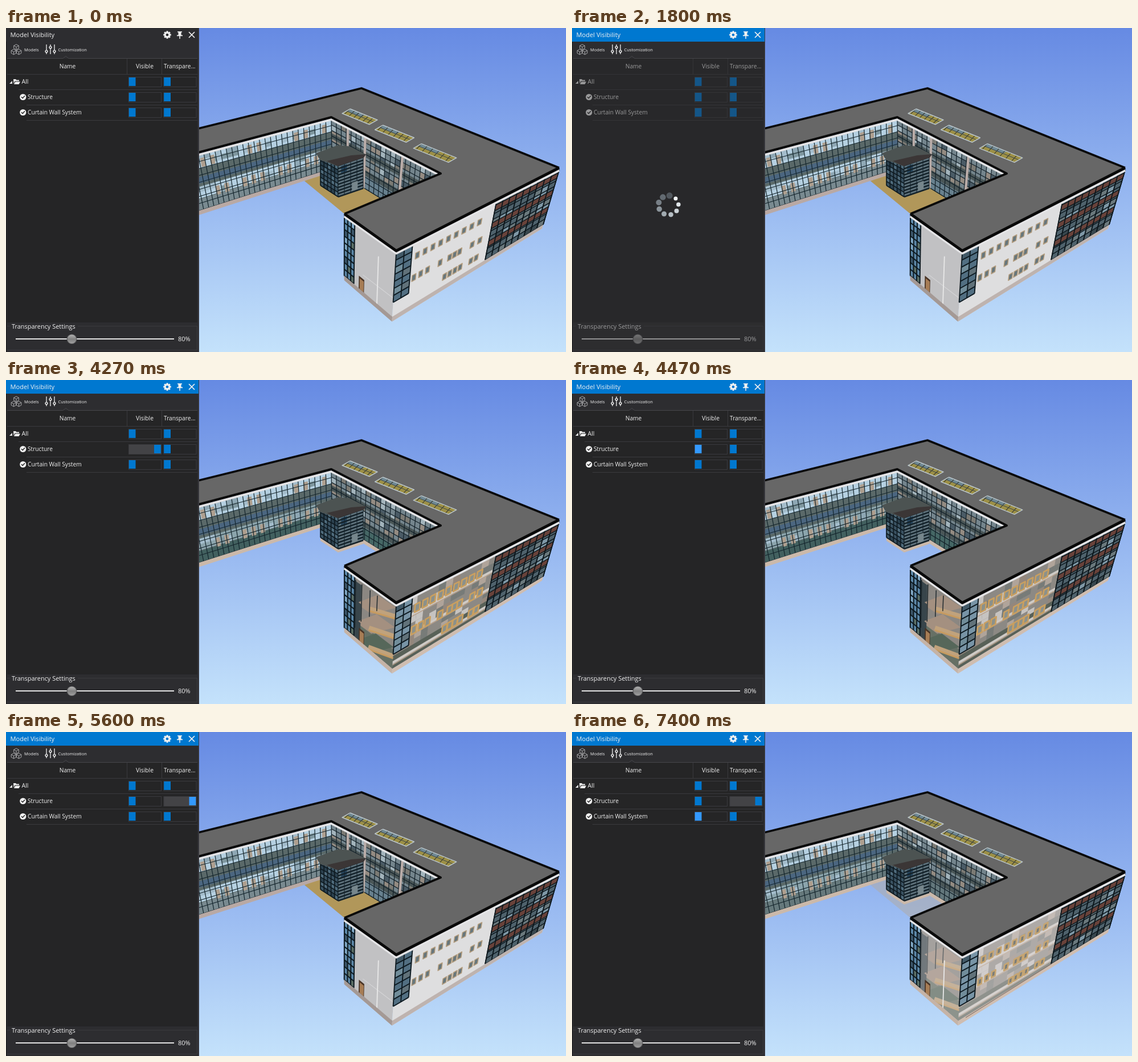
Write an HTML page with a canvas that moves like this. It is 983x570 px and loops after 8000 ms.

```html
<!DOCTYPE html>
<html lang="en">
<head>
<meta charset="utf-8">
<title>Model Visibility</title>
<style>
html,body{margin:0;width:100%;height:100%;overflow:hidden;background:#252526}
canvas{display:block;width:983px;height:570px}
</style>
</head>
<body>
<canvas id="stage" width="983" height="570"></canvas>
<script>
const W = 983, H = 570, LOOP = 8000;
const SOLID = 0, HIDDEN = 1, CLEAR = 2;
const view = document.getElementById('stage').getContext('2d');
let c = view;

// ---------- helpers ----------
const noise = n => { const s = Math.sin(n * 12.9898 + 4.1) * 43758.5453; return s - Math.floor(s); };
const pick = (list, r) => list[Math.floor(r * list.length)];
const mix = (a, b, t) => [a[0] + (b[0] - a[0]) * t, a[1] + (b[1] - a[1]) * t];
const times = (n, f) => { for (let i = 0; i < n; i++) f(i); };

function trace(pts) {
  c.beginPath();
  pts.forEach(([x, y], i) => i ? c.lineTo(x, y) : c.moveTo(x, y));
}
function fill(color, ...pts) { trace(pts); c.closePath(); c.fillStyle = color; c.fill(); }
function line(color, w, ...pts) { trace(pts); c.strokeStyle = color; c.lineWidth = w; c.stroke(); }
function box(color, x, y, w, h) { c.fillStyle = color; c.fillRect(x, y, w, h); }
function disc(color, x, y, r) { c.beginPath(); c.arc(x, y, r, 0, 7); c.fillStyle = color; c.fill(); }

// A surface maps (u, v) in the unit square to the stage.
const quad = (tl, tr, br, bl) => (u, v) => mix(mix(tl, tr, u), mix(bl, br, u), v);
const part = (P, u0, v0, u1, v1) => (u, v) => P(u0 + (u1 - u0) * u, v0 + (v1 - v0) * v);
const outline = P => [P(0, 0), P(1, 0), P(1, 1), P(0, 1)];
const cell = (P, color, u0 = 0, v0 = 0, u1 = 1, v1 = 1) => fill(color, ...outline(part(P, u0, v0, u1, v1)));

function grid(P, nu, nv, color, w) {
  times(nu + 1, i => line(color, w, P(i / nu, 0), P(i / nu, 1)));
  times(nv + 1, j => line(color, w, P(0, j / nv), P(1, j / nv)));
}
function speckle(P, nu, nv, seed, share, colors) {
  times(nu * nv, k => {
    const i = k % nu, j = Math.floor(k / nu), r = noise(seed + i * 17 + j * 5);
    if (r < share) cell(P, pick(colors, r / share), i / nu, j / nv, (i + 1) / nu, (j + 1) / nv);
  });
}
function glazing(P, nu, nv, base, tints, seed, w) {
  cell(P, base);
  speckle(P, nu, nv, seed, .5, tints);
  grid(P, nu, nv, '#0e1a21', w);
}

// ---------- building ----------
const BACK = [624, 106], RIGHT = [971, 246], FRONT = [685, 392], NOSE = [594, 327];
const INNER = [763, 256], NOOK = [571, 157], FAR_OUT = [240, 201], FAR_IN = [240, 245];
const SILL = .93;

// Uprights lean towards a vanishing point and grow with nearness.
const foot = ([x, y]) => [x - (x - 590) * .079, y * 1.12 + 73];
function wall(p, q) {
  const a = [p[0], p[1] + 4], b = [q[0], q[1] + 4];
  return quad(a, b, foot(b), foot(a));
}
const west = wall(FAR_IN, NOOK), east = wall(NOOK, INNER);
const end = wall(NOSE, FRONT), long = wall(FRONT, RIGHT);

function westGlass(mode) {
  const P = part(west, 0, 0, 1, SILL);
  const ground = ['#798a90', '#42605f', '#66797c'][mode];
  cell(P, ground);
  cell(P, '#5a6969', 0, .25, 1, .8);
  cell(P, '#4b6680', 0, .41, 1, .52);
  times(2, f => {
    const v = f * .58;
    cell(P, f && mode ? '#8ba4ac' : '#b5d0e1', 0, v, 1, v + .25 - f * .04);
    speckle(part(P, 0, v, 1, v + .2), 34, 2, f * 40, .3, ['#8ea7b4', '#a3bccb', '#7f979f']);
    times(14, i => {
      const u = .3 + i * .05;
      if (noise(i + f * 9) < .45) cell(P, '#ae9f8f', u, v + .07, u + .024, v + .24);
    });
  });
  times(34, i => line('#14252c', 1.2, P(i / 34, 0), P(i / 34, 1)));
  times(9, j => line('#16272e', 1.1, P(0, j * .125), P(1, j * .125)));
}

function eastGlass(mode) {
  const P = part(east, 0, 0, 1, SILL);
  cell(P, '#74858d');
  speckle(P, 22, 9, 300, .4, ['#a3b4bc', '#7b7a74', '#948b82', '#4a5b66']);
  times(2, f => cell(P, '#4a5657', 0, .28 + f * .36, 1, .39 + f * .36));
  cell(P, ['#67808e', '#456765', '#63777c'][mode], 0, .76, 1, 1);
  grid(P, 22, 9, '#14222a', 1.25);
  if (mode === SOLID) [.14, .3, .64].forEach(u => cell(P, '#b9aca8', u, 0, u + .022, 1));
}

function pavilion(mode) {
  const top = [583, 242], low = [583, 297];
  const side = quad([552, 226], top, low, [552, 277]);
  const face = quad(top, [627, 227], [627, 282], low);
  if (mode !== SOLID) [side, face].forEach(P => cell(P, '#cbb9aa', 0, .9, 1, 1.12));
  glazing(side, 5, 7, '#3a5262', ['#4f6b7c', '#2b404e'], 8, 1.7);
  cell(face, '#61757f');
  cell(face, '#26465f', .12, .05, .35, .28);
  times(11, j => line('#15232b', 2.4, face(0, j / 10), face(1, j / 10)));
  times(5, i => line('#15232b', 1, face(i / 4, 0), face(i / 4, 1)));
  cell(face, '#76868c', .55, .7, .78, .97);
  fill('#4c5352', [544, 220], [583, 206], [603, 208], [633, 223], [582, 243], [551, 232]);
  fill('#3b3636', [563, 234], [606, 224], [632, 222], [628, 228], [582, 243]);
}

function courtyard(mode) {
  const plinth = mode === SOLID ? '#b9a9a4' : '#cbb9aa';
  const ground = ['#b1975a', 'transparent', 'rgba(176,172,170,.55)'][mode];
  fill(ground, west(.84, 1), west(1, SILL), east(.6, SILL), NOSE);
  westGlass(mode);
  cell(west, plinth, 0, SILL, 1, 1);
  eastGlass(mode);
  if (mode !== SOLID) cell(east, plinth, .3, SILL, 1, 1);
  pavilion(mode);
}

function skylight(i) {
  const x = 621 + 56 * i + 5 * i * i, y = 156 + 28 * i + 2 * i * i, k = 1 + .14 * i;
  const at = (a, b) => [x + a * 24 * k + b * 7, y + a * 9.7 * k - b * 4];
  const P = quad(at(-1, 1), at(1, 1), at(1, -1), at(-1, -1));
  cell(P, '#9d9046');
  cell(P, '#708994', 0, 0, .55, .5);
  times(6, j => line('#3a3a30', 1.1, P(j / 6, 0), P(j / 6 + .08, 1)));
  line('#3a464a', 1, P(0, .45), P(1, .45));
  line('#bac6cc', 1.5, ...outline(P), P(0, 0));
}

function roof() {
  const drop = ([x, y]) => [x, y + 4];
  line('#e3e3e5', 4, ...[FAR_IN, NOOK, INNER].map(drop));
  fill('#676767', FAR_OUT, BACK, RIGHT, FRONT, NOSE, INNER, NOOK, FAR_IN);
  times(3, skylight);
  line('#090909', 3.6, FAR_OUT, BACK, RIGHT);
  line('#090909', 4, FAR_IN, NOOK, INNER, NOSE);
}

function wallWindows(mode) {
  // each run: first u, step, count, height v
  const runs = [[.137, .0485, 9, .2], [.127, .0435, 3, .52], [.295, 0, 1, .52],
    [.356, .032, 3, .52], [.5, .049, 2, .52], [.338, .034, 4, .79], [.51, .035, 2, .79]];
  const grow = [1, 1.3, 1][mode], du = .012 * grow, dv = .044 * grow;
  for (const [first, step, count, v] of runs) times(count, i => {
    const u = first + i * step, P = part(long, u - du, v - dv, u + du, v + dv);
    cell(P, ['#66767c', '#8b918b', '#7b7d78'][mode]);
    line(['#b39c7d', '#c99f60', '#c6a572'][mode], mode ? 2.6 : 1.5, ...outline(P), P(0, 0), P(1, 0));
  });
}

function interior(mode) {
  const S = part(long, 0, 0, .62, SILL), E = part(end, 0, 0, 1, SILL);
  cell(E, '#8b8782');
  cell(E, '#667065', 0, .7, 1, 1);
  cell(S, '#8c8984');
  speckle(S, 14, 7, 700, .5, ['#c6c3c0', '#94877c', '#b0a49a', '#777b78']);
  cell(S, '#586158', 0, .8, 1, 1);
  times(3, f => {
    const v = f * .31;
    cell(S, '#cfcac5', 0, v + .26, 1, v + .31);
    line('#b7a08c', 1.5, S(0, v + .32), S(1, v + .32));
    cell(E, '#38454b', .2, v + .08, .33, v + .4);
    fill(f < 2 ? '#a49080' : '#56675a', E(.23, v + .44), E(.64, v + .05), E(1, v + .04), E(.55, v + .42));
    const a = E(.5, v + .36), b = E(1, v + .18);
    line('#c0a27c', 8, a, b);
    line('#c79b60', 3, [a[0], a[1] + 4], [b[0], b[1] + 4]);
  });
  [.22, .34, .5, .64].forEach((u, i) => line('#202a2e', 1.5, E(u, .06), E(u, .85 - .18 * i)));
  if (mode === CLEAR) {
    cell(E, 'rgba(205,203,203,.38)', .2);
    cell(S, 'rgba(224,221,219,.4)');
  }
}

function wing(mode) {
  const solid = mode === SOLID;
  if (solid) {
    cell(end, '#c1c1c3');
    cell(long, '#dededf');
    line('#d5d5d7', 1.2, end(.38, .68), end(1, .66));
  } else interior(mode);
  if (mode !== HIDDEN) line('#e8e8e8', 1.8, end(.67, .23), end(.68, .94));
  cell(end, '#493426', .3, .74, .41, .95);
  cell(end, '#a77d55', .32, .77, .4, .93);
  wallWindows(mode);

  glazing(part(end, 0, 0, .2, SILL), 3, 9, '#5d88a8', ['#3c566a', '#7fa7c4', '#5d7168'], 40, 2);
  glazing(part(long, 0, 0, .1, .72), 2, 7, solid ? '#526f82' : '#7894a6', ['#718d9a', '#435a68', '#61727a'], 60, 1.9);

  const G = part(long, .615, 0, 1, SILL);
  glazing(G, 9, 10, '#4f626c', ['#7f98a6', '#38474e', '#6b797d'], 21, 1.5);
  times(3, f => {
    const v = .05 + f * .31;
    cell(G, '#69423a', 0, v, 1, v + .1);
    [v, v + .1].forEach(e => line('#11191d', 1.4, G(0, e), G(1, e)));
  });
  times(10, i => line('#0c161b', 1.7, G(i / 9, 0), G(i / 9, 1)));

  cell(end, solid ? '#a49995' : '#c5b3a6', 0, SILL, 1, 1);
  cell(long, solid ? '#beb3af' : '#cfbdb0', 0, SILL, 1, 1);
  if (mode === CLEAR) line('#72615a', 1, long(.05, .95), long(.62, .93));

  const drop = ([x, y]) => [x, y + 4];
  line('#e4e4e6', 5, ...[NOSE, FRONT, RIGHT].map(drop));
  line('#090909', 5, NOSE, FRONT, RIGHT);
}

function scene(mode) {
  const layer = document.createElement('canvas');
  layer.width = W; layer.height = H;
  c = layer.getContext('2d');
  const sky = c.createLinearGradient(0, 0, 0, H);
  sky.addColorStop(0, '#668ae3');
  sky.addColorStop(.5, '#95b6f0');
  sky.addColorStop(1, '#c4e2fb');
  box(sky, 0, 0, W, H);
  c.lineJoin = 'round';
  courtyard(mode);
  roof();
  wing(mode);
  c = view;
  return layer;
}
const scenes = [SOLID, HIDDEN, CLEAR].map(scene);

// ---------- panel ----------
const INK = '#f1f1f1', EDGE = '#3a3a3e', BAR = '#2d2d30', LIST = '#252526', BLUE = '#0078d0', LIT = '#3399ff';
const ROW = 27;

function text(s, x, y, size, align = 'left') {
  c.font = size + 'px "Open Sans", "Noto Sans", sans-serif';
  c.textAlign = align;
  c.fillStyle = INK;
  c.fillText(s, x, y + size * .36);
}

function titleIcons(back) {
  times(4, i => {
    const a = i * Math.PI / 4, x = 6.8 * Math.cos(a), y = 6.8 * Math.sin(a);
    line(INK, 3, [283 - x, 12 - y], [283 + x, 12 + y]);
  });
  disc(INK, 283, 12, 5.2);
  disc(back, 283, 12, 2.3);
  box(INK, 301, 6, 8, 1.5);
  box(INK, 302.5, 7, 5, 6);
  box(INK, 300, 12.5, 10, 1.7);
  box(INK, 304.3, 14, 1.5, 5);
  [5, -5].forEach(d => line(INK, 1.7, [321, 12 - d], [331, 12 + d]));
}
function cube(x, y) {
  const at = k => [x + 5 * Math.sin(k * Math.PI / 3), y - 4.7 * Math.cos(k * Math.PI / 3)];
  line('#b4b4b6', .9, ...[0, 1, 2, 3, 4, 5, 0].map(at));
  [1, 3, 5].forEach(k => line('#b4b4b6', .9, [x, y], at(k)));
}
function tabs() {
  cube(18, 33.5); cube(13.5, 42); cube(22.5, 42);
  times(3, i => {
    const x = 71 + 7 * i, y = i === 1 ? 34 : 41;
    line(INK, 1.3, [x, 29], [x, 46]);
    disc(INK, x, y, 2.6);
    disc(BAR, x, y, 1.2);
  });
  text('Models', 32, 38, 7.5);
  text('Customization', 91.5, 38, 7.5);
}
function toggle(col, row, on, lit) {
  const x = 215 + 61.5 * col, y = 86 + row * ROW;
  box(EDGE, x, y, 58, 18);
  box(on ? '#434346' : LIST, x + 1, y + 1, 56, 16);
  box(lit ? LIT : BLUE, x + (on ? 45 : .7), y + 1, 11.8, 15);
}
function folder() {
  fill(INK, [11, 93], [11, 98], [6, 98]);
  fill(INK, [13, 90], [17, 90], [18.5, 91.5], [23, 91.5], [23, 93.5], [15.5, 93.5], [13.5, 98]);
  fill(INK, [16.3, 94.5], [25, 94.5], [22.5, 99], [14, 99]);
}
function item(name, row) {
  const y = 94.3 + row * ROW;
  disc(INK, 29.8, y + .2, 5.6);
  line(LIST, 1.5, [27, y], [29.2, y + 2.2], [33, y - 2]);
  text(name, 38, y, 10.2);
}
function slider() {
  box(EDGE, 2, 524, 5, 1);
  box(EDGE, 126, 524, 209, 1);
  box(EDGE, 335, 524, 1, 42);
  box(EDGE, 2, 566, 334, 1);
  text('Transparency Settings', 10, 525, 10.95);
  box('#e4e4e4', 17, 546, 278, 2);
  const knob = c.createLinearGradient(0, 539, 0, 556);
  knob.addColorStop(0, '#b4b4b4');
  knob.addColorStop(.5, '#808080');
  knob.addColorStop(1, '#a5a5a5');
  disc('#5b5b5d', 115.5, 547.2, 8.8);
  disc(knob, 115.5, 547.2, 7.8);
  text('80%', 302, 547, 11);
}

function panel(t) {
  const during = (a, b) => t >= a && t < b;
  const title = t >= 1730 ? BLUE : BAR;
  box(BAR, 0, 0, 338, H);
  box('#1b1b1c', 0, 0, 1, H);
  box('#3f3f46', 338, 0, 1, H);
  box(title, 0, 0, 338, 24);
  text('Model Visibility', 7.5, 12, 11.1);
  titleIcons(title);
  tabs();

  box(LIST, 2, 54, 334, 464);
  line('#46464a', 1, [2, 53.5], [100, 53.5], [105, 49.5], [110, 53.5], [336, 53.5]);
  times(4, i => {
    const x = [2, 22, 36, 36][i];
    box(EDGE, x, 81 + i * ROW, 336 - x, 1);
  });
  box(EDGE, 212, 54, 1, 27);
  box(EDGE, 273, 54, 1, 27);
  text('Name', 108, 67, 10.2, 'center');
  text('Visible', 243.5, 67, 10.3, 'center');
  text('Transpare...', 277, 67, 10.2);
  folder();
  text('All', 27.5, 94, 10.5);
  item('Structure', 1);
  item('Curtain Wall System', 2);

  // a thumb is lit while the pointer rests on it, dark while pressed
  const lit = [
    [false, during(870, 1730) || during(2070, 4270) || during(4470, 4870), during(730, 800) || t >= 7400],
    [false, during(5070, 5400) || during(5600, 7330), false]
  ];
  const on = [during(2070, 4470), t >= 5600];
  times(6, k => {
    const col = k % 2, row = k >> 1;
    toggle(col, row, row === 1 && on[col], lit[col][row]);
  });

  slider();
  if (during(1800, 2070)) busy(t - 1800);
  if (during(4870, 5070)) busy(t - 4870);
}

function busy(t) {
  box('rgba(45,45,48,.45)', 2, 55, 334, 513);
  const turn = Math.floor(t / 67);
  times(9, i => {
    const a = (-44 + 40 * (i + turn)) * Math.PI / 180, k = i / 8;
    disc(`rgba(${242 - 70 * k},${246 - 55 * k},${249 - 45 * k},${1 - .68 * k ** 1.3})`,
      169.3 + 17.6 * Math.cos(a), 311.7 + 17 * Math.sin(a), 3.5 + 2 * k);
  });
}

// ---------- playback ----------
const start = performance.now();
function draw(now) {
  const t = Math.max(0, now - start) % LOOP;
  const mode = t >= 5670 ? CLEAR : t >= 2000 && t < 4530 ? HIDDEN : SOLID;
  c.drawImage(scenes[mode], 0, 0);
  panel(t);
  requestAnimationFrame(draw);
}
draw(start);
</script>
</body>
</html>
```
